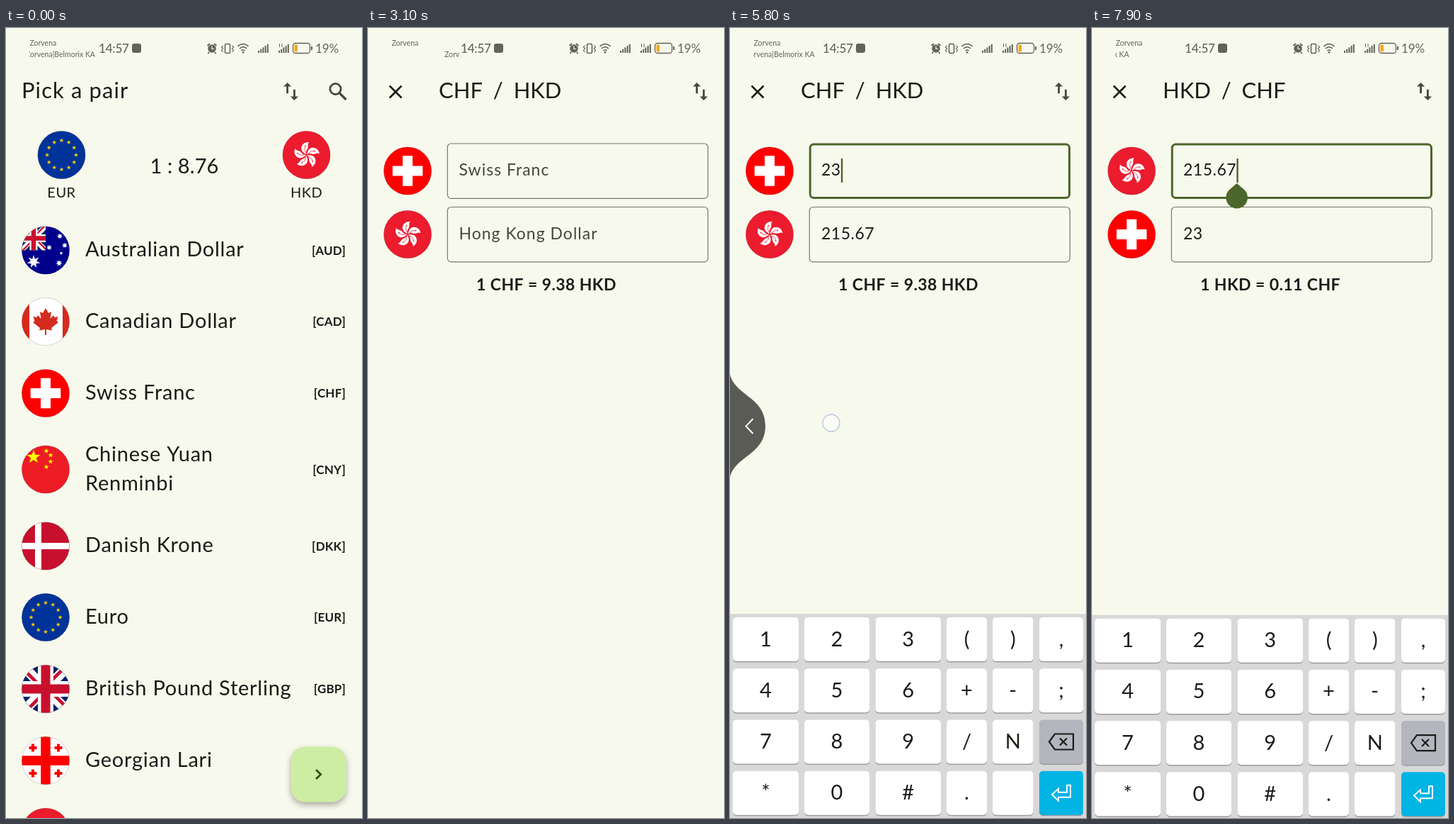
An HTML page with a canvas that plays this animation: 503 by 1114 pixels, repeating every 8 s.

```html
<!DOCTYPE html>
<html lang="en">
<head>
<meta charset="utf-8">
<title>Currency pair</title>
<style>
html, body { margin: 0; width: 100%; height: 100%; overflow: hidden; background: #f8f9ed; }
canvas { display: block; }
</style>
</head>
<body>
<canvas id="stage" width="503" height="1114"></canvas>
<script>
const c = document.getElementById('stage').getContext('2d');
const LOOP = 8000, BG = '#f8f9ed', INK = '#1a1c16', GREY = '#62635b', GREEN = '#4c662b';
const clamp = v => Math.max(0, Math.min(1, v));
const ramp = (t, from, length) => clamp((t - from) / length);

function text(s, x, y, size, { color = INK, align = 'left', weight = 400, gap = 0.5, word = 0 } = {}) {
  c.font = `${weight} ${size}px Lato, "Open Sans", sans-serif`;
  c.letterSpacing = gap + 'px';
  c.wordSpacing = word + 'px';
  c.textAlign = align;
  c.fillStyle = color;
  c.fillText(s, x, y);
}
function rect(x, y, w, h, color) {
  c.fillStyle = color;
  c.fillRect(x, y, w, h);
}
function round(x, y, w, h, r, fill, stroke, width = 1) {
  c.beginPath();
  c.roundRect(x, y, w, h, r);
  if (fill) { c.fillStyle = fill; c.fill(); }
  if (stroke) { c.strokeStyle = stroke; c.lineWidth = width; c.stroke(); }
}
function disc(x, y, r, fill, stroke, width = 1) {
  round(x - r, y - r, 2 * r, 2 * r, r, fill, stroke, width);
}
function line(d, color, width) {
  c.strokeStyle = color;
  c.lineWidth = width;
  c.stroke(new Path2D(d));
}
function shape(d, color) {
  c.fillStyle = color;
  c.fill(new Path2D(d));
}
function at(x, y, draw) {
  c.save();
  c.translate(x, y);
  draw();
  c.restore();
}
function shadow(blur, dy, alpha) {
  c.shadowColor = `rgba(0,0,0,${alpha})`;
  c.shadowBlur = blur;
  c.shadowOffsetY = dy;
}
function star(x, y, r, color, points = 5, inner = 0.4) {
  c.beginPath();
  for (let i = 0; i < 2 * points; i++) {
    const a = Math.PI * (i / points - 0.5), q = i % 2 ? r * inner : r;
    c.lineTo(x + q * Math.cos(a), y + q * Math.sin(a));
  }
  c.fillStyle = color;
  c.fill();
}
function cross(x, y, half, thick, color) {
  rect(x - half, y - thick / 2, 2 * half, thick, color);
  rect(x - thick / 2, y - half, thick, 2 * half, color);
}

// Flags are drawn around 0,0 inside a circle of radius R.
const R = 33.7;
function unionJack() {
  rect(-34, -34, 68, 68, '#012169');
  line('M-34-34 34 34M34-34-34 34', '#fff', 14);
  line('M-36-32.5 0 3.5M36-39.5 0-3.5M36 32.5 0-3.5M-36 39.5 0 3.5', '#c8102e', 4.7);
  cross(0, 0, 34, 22, '#fff');
  cross(0, 0, 34, 13, '#c8102e');
}
const leaf = [[0, -19], [4, -12], [8, -14], [6.5, -4], [11, -9], [12.5, -6], [17.5, -7],
  [15.5, -1], [18, 1], [8, 9], [9, 12.5], [1, 11], [1, 19]];
const flags = {
  AUD() {
    rect(-34, -34, 68, 68, '#00008b');
    c.save();
    c.beginPath();
    c.rect(-34, -34, 34, 34);
    c.clip();
    c.translate(-17, -17);
    c.scale(0.5, 0.5);
    unionJack();
    c.restore();
    star(-17, 16, 9.5, '#fff', 7, 0.45);
    for (const [x, y, r] of [[20, -20, 4.2], [5, -4, 4.2], [27, -7, 4.2], [19, 18, 4.8], [22, 4, 2.6]])
      star(x, y, r, '#fff', 7, 0.45);
  },
  CAD() {
    rect(-34, -34, 68, 68, '#fff');
    rect(-34, -34, 11, 68, '#d52b1e');
    rect(24, -34, 11, 68, '#d52b1e');
    c.beginPath();
    for (const [x, y] of leaf) c.lineTo(x, y);
    for (const [x, y] of [...leaf].reverse()) c.lineTo(-x, y);
    c.fillStyle = '#d52b1e';
    c.fill();
  },
  CHF() {
    rect(-34, -34, 68, 68, '#f00');
    cross(0, 0, 21.3, 14, '#fff');
  },
  CNY() {
    rect(-34, -34, 68, 68, '#ee1c25');
    star(-17, -17.5, 10, '#ff0');
    for (const [x, y] of [[1, -26], [7, -20], [7, -11], [1, -3.5]]) star(x, y, 3.8, '#ff0');
  },
  DKK() {
    rect(-34, -34, 68, 68, '#c8102e');
    rect(-34, -4.5, 68, 9, '#fff');
    rect(-15, -34, 9, 68, '#fff');
  },
  EUR() {
    rect(-34, -34, 68, 68, '#039');
    for (let i = 0; i < 12; i++)
      star(20.5 * Math.sin(i * Math.PI / 6), -20.5 * Math.cos(i * Math.PI / 6), 3.3, '#fc0');
  },
  GBP: unionJack,
  GEL() {
    rect(-34, -34, 68, 68, '#fff');
    cross(0, 0, 34, 13.5, '#f00');
    for (const x of [-18, 18]) for (const y of [-18, 18]) cross(x, y, 5.5, 4, '#f00');
  },
  HKD() {
    rect(-34, -34, 68, 68, '#ec1b2e');
    for (let i = 0; i < 5; i++) {
      shape('M0-1C-6-3-10-9-5-15C-3-17.5 1-18.5 4-18C1-16 3-13 2-10C1-7-2-5 0-1Z', '#fff');
      line('M-1-3Q-4-8-2-12', '#ec1b2e', 0.7);
      star(-1.5, -12.5, 1.5, '#ec1b2e');
      c.rotate(Math.PI * 0.4);
    }
  }
};
function flag(code, x, y) {
  at(x, y, () => {
    c.save();
    c.beginPath();
    c.arc(0, 0, R, 0, 7);
    c.clip();
    flags[code]();
    c.restore();
    disc(0, 0, R, null, 'rgba(60,60,60,.3)', 0.7);
  });
}

function swapIcon(x) {
  at(x, 89.5, () => {
    c.scale(1.4, 1.4);
    shape('M-3.5-9-7.5-5H-4.5V2H-2.5V-5H.5ZM4.5 5V-2H2.5V5H-.5L3.5 9 7.5 5Z', '#44483d');
  });
}

function statusBar(t) {
  const s = t / 1000;
  text('Zorvena', 33.5, 25, 10.5, { color: GREY, gap: 0 });
  c.save();
  c.beginPath();
  c.rect(33, 30, 96, 15);
  c.clip();
  for (const x of [28 - 35.9 * s, 207.2 - 32 * s])
    text('Zorvena|Belmorix KA', x, 40.5, 10.5, { color: GREY, gap: 0 });
  c.restore();
  text('14:57', 131, 34.5, 17, { color: GREY, weight: 500, gap: -0.2 });
  round(178, 22, 13, 13, 3, GREY);
  disc(291, 29, 5.8, GREY);
  line('M284.5 25 288 22M297.5 25 294 22M287 34 285.5 36M295 34 296.5 36', GREY, 2);
  line('M291 25.5V29.5H294', BG, 1.2);
  round(309.5, 22.5, 7, 13, 1.5, null, GREY, 1.6);
  line('M306.5 24.5 304.5 27 306.5 29 304.5 31.5 306.5 34M319.5 24.5 321.5 27 319.5 29 321.5 31.5 319.5 34', GREY, 1.2);
  line('M327.5 26Q335 19 342.5 26M330 29Q335 24.5 340 29M332.5 32Q335 30 337.5 32', GREY, 1.6);
  disc(335, 34.3, 1.4, GREY);
  for (const x of [356, 385])
    for (let i = 0; i < 5; i++) rect(x + i * 3.2, 32 - i * 2.3, 2, 3 + i * 2.3, GREY);
  line('M386.5 22V27M390 22V27', GREY, 1);
  round(405.5, 21.5, 24, 14, 3.5, null, GREY, 1.3);
  rect(431, 26, 2, 5, GREY);
  round(407.5, 23.5, 4.5, 10, 1.5, '#f9a51b');
  text('19%', 437, 34.5, 17, { color: GREY, gap: -0.1 });
}

const rows = [
  ['AUD', 313.5, 'Australian Dollar'], ['CAD', 414, 'Canadian Dollar'], ['CHF', 515, 'Swiss Franc'],
  ['CNY', 622.5, 'Chinese Yuan', 'Renminbi'], ['DKK', 730.5, 'Danish Krone'], ['EUR', 831, 'Euro'],
  ['GBP', 932, 'British Pound Sterling'], ['GEL', 1033, 'Georgian Lari'], ['HKD', 1133.7, 'Hong Kong Dollar']
];
function listPage(t) {
  const picked = t >= 1150, base = picked ? 'CHF' : 'EUR';
  text('Pick a pair', 22, 98.5, 31, { gap: 1.1 });
  swapIcon(402.5);
  disc(465.5, 86, 7.6, null, '#44483d', 2.8);
  line('M471 91.5 480.5 101', '#44483d', 3.2);
  [[base, 78.5], ['HKD', 424.5]].forEach(([code, x]) => {
    flag(code, x, 179);
    text(code, x, 239, 20, { align: 'center' });
  });
  text(picked ? '1 : 9.38' : '1 : 8.76', 252, 205, 29, { align: 'center', gap: 0.1 });
  for (const [code, y, name, more] of rows) {
    flag(code, 56, y);
    text(name, 112, more ? y - 12 : y + 8.5, 29, { gap: 0.75 });
    if (more) text(more, 112, y + 29, 29, { gap: 0.75 });
    if (code !== 'GEL') text(`[${code}]`, 480, y + 6, 17, { align: 'right', weight: 700, gap: 0.2 });
  }
  c.save();
  shadow(8, 4, 0.32);
  round(402.5, 1013.5, 78, 78, 20, '#cdeda3');
  c.restore();
  line('M438 1046 444.7 1052.5 438 1059', '#354e16', 2.8);
}

function field(y, focused) {
  if (focused) round(113.2, y + 1, 366.3, 75.5, 5, null, GREEN, 3);
  else round(112.3, y, 368, 77.3, 5, null, '#75796c', 1.2);
}
function pairPage(t) {
  const swapped = t >= 6660, focused = t >= 3500;
  const [a, b] = swapped ? ['HKD', 'CHF'] : ['CHF', 'HKD'];
  line('M30.5 81.5 47.5 98.5M47.5 81.5 30.5 98.5', INK, 2.5);
  text(`${a}  /  ${b}`, 100, 98.5, 31, { gap: 0, word: -0.5 });
  const ripple = ramp(t, 6520, 60) * (1 - ramp(t, 6680, 220));
  if (ripple) disc(469.5, 90, 28, `rgba(68,72,61,${0.035 * ripple})`);
  swapIcon(469.5);
  flag(a, 56, 201.5);
  flag(b, 56, 291);
  field(163, focused);
  field(252.5, false);

  if (t < 4560) {
    const label = { color: '#44483d', gap: 1 };
    text('Swiss Franc', 128.5, 208, 23, label);
    text('Hong Kong Dollar', 128.5, 297.5, 23, label);
  }
  let typed = '', result = '';
  if (t >= 4480) [typed, result] = ['2', '18.75'];
  if (t >= 4800) [typed, result] = ['23', '215.67'];
  if (swapped) [typed, result] = [result, typed];
  text(typed, 129, 208, 23);
  const caret = 130 + c.measureText(typed).width;
  text(result, 129, 297.5, 23);
  text(`1 ${a} = ${swapped ? '0.11' : '9.38'} ${b}`, 252, 370, 23, { align: 'center', weight: 700, gap: 0.4 });

  const since = [7560, 4800, 4480, 3500].find(s => t >= s);
  if (focused && (t - since) % 1000 < 500) rect(caret - 0.8, 184, 2.4, 34, GREEN);
  if (t >= 7560)
    at(caret - 0.5, 239, () => shape('M0-20 11-10.5A15.3 15.3 0 1 1-11-10.5Z', GREEN));
}

const columns = [[4, 93], [105, 92], [205.5, 92.5], [306, 57], [371, 57.5], [437, 62]];
const keys = ['123(),', '456+-;', '789/N<', '*0#. >'];
function keyboard(t) {
  let drop = 1;
  if (t >= 3560) drop = (1 - ramp(t, 3560, 365)) ** 3;
  if (t >= 5760) drop = ramp(t, 5760, 300) ** 1.7;
  if (t >= 7660) drop = (1 - ramp(t, 7660, 365)) ** 3;
  if (drop >= 1) return;
  at(0, 816 + 298 * drop, () => {
    rect(0, 0, 503, 300, '#d8d8d8');
    keys.forEach((row, j) => columns.forEach(([x, w], i) => {
      const y = 5 + 72.2 * j, key = row[i];
      round(x, y + 1.5, w, 62, 5, '#9b9c9e');
      round(x, y, w, 62, 5, key === '<' ? '#b3b6bd' : key === '>' ? '#00b4e4' : '#fff');
      at(x + w / 2, y + 31, () => {
        if (key === '<') {
          line('M-17 0-9-11H17V11H-9ZM-2-5 8 5M8-5-2 5', INK, 2.2);
        } else if (key === '>') {
          line('M-13 2-4-6V-1H8V-11H13V6H-4V11Z', '#fff', 1.9);
        } else text(key, 0, 9.5, 29, { align: 'center', gap: 0 });
      });
    }));
  });
  const pop = t >= 4380 && t < 4560 ? 1 : t >= 4680 && t < 4860 ? 2 : 0;
  if (!pop) return;
  const x = columns[pop][0] - 5;
  c.save();
  shadow(5, 1, 0.35);
  round(x, 747.5, 104, 134.5, 10, '#fff');
  c.restore();
  text(pop + 1, x + 52, 801, 40, { color: '#14a8d8', align: 'center', gap: 0 });
}

// Edge swipe that dismisses the keyboard.
function backArrow(t) {
  const size = ramp(t, 5600, 180) * (1 - ramp(t, 5840, 180));
  if (!size) return;
  c.save();
  c.scale(size, 1);
  shape('M0 488C6 518 50 520 50 561C50 602 6 604 0 634Z', '#5a5b54');
  line('M32.5 551 22.5 561.5 32.5 572', '#fff', 2);
  c.restore();
}

const taps = [[1000, 1130, 250, 515], [2400, 2520, 441, 1052], [3400, 3510, 290, 203], [4380, 4550, 167, 865],
  [4700, 4850, 262, 865], [5550, 5830, 143, 557], [6520, 6650, 473, 75], [7450, 7560, 330, 203]];
function touch(t) {
  const tap = taps.find(([from, to]) => t >= from && t < to);
  if (!tap) return;
  const x = tap[0] === 5550 ? tap[2] * ramp(t, 5550, 240) : tap[2];
  disc(x, tap[3], 12, 'rgba(255,255,255,.45)', '#b4c7e0', 1.3);
}

function frame(now) {
  const t = now % LOOP, fade = ramp(t, 2500, 350);
  rect(0, 0, 503, 1114, BG);
  statusBar(t);
  c.globalAlpha = 1 - fade;
  if (fade < 1) listPage(t);
  c.globalAlpha = fade;
  if (fade > 0) pairPage(t);
  c.globalAlpha = 1;
  keyboard(t);
  backArrow(t);
  touch(t);
}

const start = performance.now();
(function tick() {
  frame(performance.now() - start);
  requestAnimationFrame(tick);
})();
</script>
</body>
</html>
```
